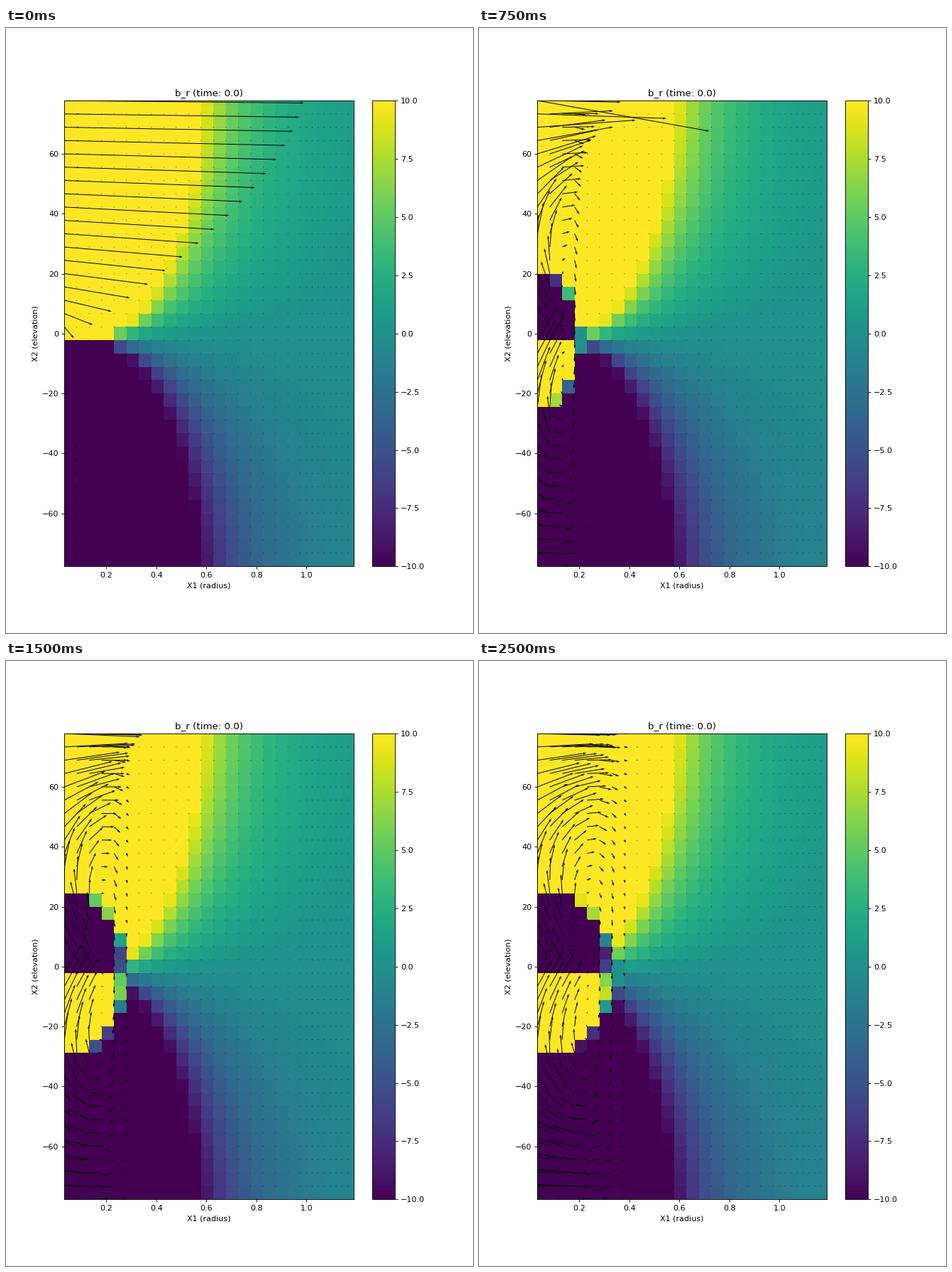
Recreate the animation shown at these times as a matplotlib script. Size 658 px wide and 851 px high, loop 2750 ms.

```python
import numpy as np
import matplotlib.pyplot as plt
from matplotlib.animation import FuncAnimation

W, H, DPI = 658, 851, 80
FRAMES, STEP_MS = 11, 250

# Radius grid refines towards the outer wall; elevation is in degrees.
R_MIN, R_MAX, DR = 0.0327, 1.19, 0.04965
COARSE = 19
radius = np.concatenate([
    R_MIN + DR * np.arange(COARSE),
    np.linspace(R_MIN + DR * COARSE, R_MAX, 10),
])
elevation = (np.arange(36) - 17.5) * 160 / 36
R, E = np.meshgrid(radius, elevation)
SIN, COS = np.sin(np.radians(E)), np.cos(np.radians(E))
S = np.abs(E) / elevation[-1]
COLUMN = (R - R_MIN) / DR
ROW = np.arange(18)[:, None]


def reversed_zone(step):
    """Upper-half limit on b_r from the reversed bubble growing at the axis."""
    height = 6.3 * (1 - np.exp(-step / 1.95))
    reach = 0.33 + 2.55 * np.log(step)
    x = (COLUMN[18:] / reach) ** 2.5
    depth = ROW + 0.5 - height * (1 - x)
    slope = 50 * (1 - x) ** 2
    slope = np.where(depth < 0, slope, np.maximum(slope, 15))
    damping = np.minimum(1, (ROW + 0.7) / 2)
    return np.where(x < 1, slope * depth * damping, np.inf)


def radial_field(step):
    """Cell values of b_r, antisymmetric about the equator."""
    upper = (1.77 * SIN / R**3)[18:]
    if step:
        upper = np.minimum(upper, reversed_zone(step))
    return np.vstack([-upper[::-1], upper])[1:, :-1]


def arrows(step):
    """Arrow components in pixels."""
    if step == 0:
        fall = (R_MIN / R) ** 5
        return 345 * SIN * fall, -16 * COS * fall

    # A circulation cell that widens and weakens.
    amp = 36 * (10 / step) ** 0.23
    c = COLUMN * 4.2 / (1.2 + 0.3 * step)
    reverse = 0.61 * np.exp(-(c / 4.2) ** 3)
    u = amp * (3.08 * S**1.6 - reverse) * np.exp(-(c / 4.3) ** 2.2)
    v = amp * (1 - 1.06 * S**3.2) * (1 - (c / 4.2) ** 2) * np.exp(-(c / 5.5) ** 4)

    # The first field fades at the axis, last of all near the pole.
    rest = 340 * np.exp(-(step / 3) ** 2)
    power = 0.9 * step**2
    tilt = np.interp(step, [2, 3], [0.11, -0.32])
    u[:, 0] += rest * S[:, 0] ** power
    v[:, 0] += rest * tilt * S[:, 0] ** (2.5 * power)
    return u * np.sign(E), v


fig, ax = plt.subplots(figsize=(W / DPI, H / DPI), dpi=DPI)
mesh = ax.pcolormesh(radius, elevation, radial_field(0), cmap="viridis", vmin=-10, vmax=10)
fig.colorbar(mesh, ax=ax)
quiver = ax.quiver(R, E, *arrows(0), scale=1, scale_units="dots", angles="uv")
ax.set_xlim(radius[0], radius[-1])
ax.set_ylim(elevation[0], elevation[-1])
ax.set_title("b_r (time: 0.0)")
ax.set_xlabel("X1 (radius)")
ax.set_ylabel("X2 (elevation)")


def update(step):
    mesh.set_array(radial_field(step))
    quiver.set_UVC(*arrows(step))
    return mesh, quiver


anim = FuncAnimation(fig, update, frames=FRAMES, interval=STEP_MS, repeat=True, repeat_delay=0)
plt.show()
```
